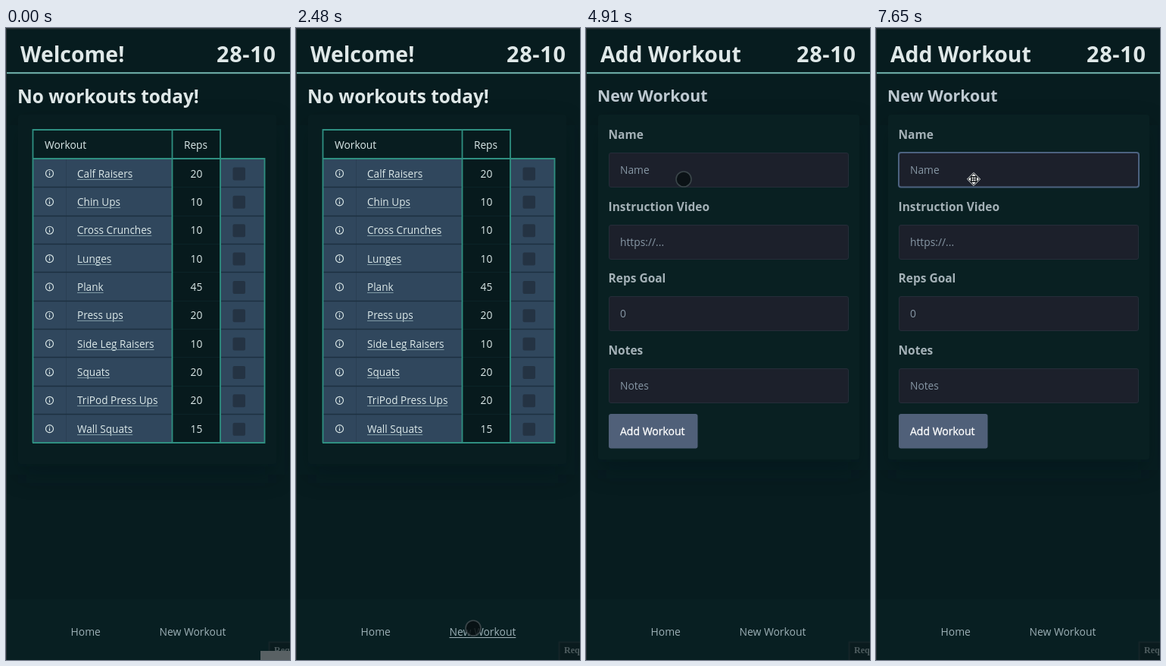
An HTML page that plays this animation: 375 by 832 pixels, repeating every 8 s.

```html
<!DOCTYPE html>
<html lang="en">
<head>
<meta charset="utf-8">
<title>Workout planner</title>
<style>
  html, body { margin: 0; width: 100%; height: 100%; overflow: hidden; background: #071c1f; }
  svg { display: block; width: 375px; height: 832px; }
  text { font-family: "Open Sans", "Noto Sans", sans-serif; white-space: pre; }
  .bold { font-weight: 700; }
  .firm { stroke: #fff; stroke-width: .3px; }
  .serif { font-family: "Liberation Serif", serif; font-weight: 700; }
</style>
</head>
<body>
<svg id="stage" viewBox="0 0 375 832" xmlns="http://www.w3.org/2000/svg">
  <defs>
    <filter id="soft" x="-20%" y="-20%" width="140%" height="140%"><feGaussianBlur stdDeviation="16"/></filter>
    <filter id="smooth" x="-20%" y="-20%" width="140%" height="140%"><feGaussianBlur stdDeviation=".7"/></filter>
    <clipPath id="listClip"><rect x="56" y="262" width="312" height="185"/></clipPath>
  </defs>
  <rect width="375" height="832" fill="#071c1f"/>
  <g id="list"></g>
  <g id="form"></g>
  <g id="frame"></g>
  <g id="popup"></g>
  <circle id="finger" r="10" fill="#081013" fill-opacity=".85" stroke="#3a4549" stroke-width="1.6"/>
  <g id="move"></g>
  <rect id="corner" x="336" y="820" width="39" height="12" fill="#596164"/>
</svg>
<script>
const $ = id => document.getElementById(id);
const LOOP = 8000;

const text = (x, y, size, fill, str, extra = "") =>
  `<text x="${x}" y="${y}" font-size="${size}" fill="${fill}" ${extra}>${str}</text>`;
const rect = (x, y, w, h, fill, extra = "") =>
  `<rect x="${x}" y="${y}" width="${w}" height="${h}" fill="${fill}" ${extra}/>`;
const path = (d, stroke, width = 1) =>
  `<path d="${d}" fill="none" stroke="${stroke}" stroke-width="${width}"/>`;
const ring = (x, y, r, stroke) =>
  `<circle cx="${x}" cy="${y}" r="${r}" fill="none" stroke="${stroke}" stroke-width="1.15"/>`;
const BOLD = 'class="bold"', FIRM = 'class="firm"', MID = 'text-anchor="middle"';
const TITLE = "#dfe8e8", CELL = "#dce9e9", NAV = "#9db0b6";

const card = (x, y, w, h, fill) =>
  rect(x, y + 14, w, h, "#05171a", 'filter="url(#soft)" opacity=".35"') + rect(x, y, w, h, fill, 'rx="4"');

function underline(el, stroke) {
  const x = el.getAttribute("x"), y = Math.round(el.getAttribute("y")) + 2.5;
  el.insertAdjacentHTML("afterend", path(`M${x} ${y}h${el.getComputedTextLength()}`, stroke));
}

function drawList() {
  const rows = ["Calf Raisers 20", "Chin Ups 10", "Cross Crunches 10", "Lunges 10", "Plank 45", "Press ups 20",
    "Side Leg Raisers 10", "Squats 20", "TriPod Press Ups 20", "Wall Squats 15"];
  const step = 37.35, top = 172, end = 546, blue = "#30475d";
  let s = text(19, 45, 28.4, TITLE, "Welcome!", BOLD)
    + text(15, 99, 24.4, TITLE, "No workouts today!", BOLD)
    + card(16, 114, 341, 460, "#081d20")
    + rect(35, top, 184, end - top, blue) + rect(283, top, 59, end - top, blue)
    + rect(219, 134, 64, end - 134, "#071a1d")
    + text(51, 159, 13.8, CELL, "Workout") + text(250.5, 159, 13.7, CELL, "Reps", MID)
    + path(`M79.5 ${top}V${end}`, "#2a4054");
  rows.forEach((row, i) => {
    const y = top + step * i, mid = y + 19.5, line = Math.round(y) + .5;
    if (i) s += path(`M36 ${line}H219M284 ${line}H341`, "#1d3040", 1.3) + path(`M220 ${line}H283`, "#0b2327");
    s += ring(57.5, mid, 5, CELL) + path(`M57.5 ${mid - .8}v3.6m0-5.8v1.2`, CELL, 1.2)
      + text(94, y + 24.5, 13.6, CELL, row.slice(0, -3), 'class="link"')
      + text(251.5, y + 24.5, 13.8, CELL, row.slice(-2), MID)
      + rect(299.5, mid - 8, 16.5, 17, "#243343", 'rx="2" filter="url(#smooth)"');
  });
  s += path(`M35.5 ${end}V134H283V${end}M219.5 134V${end}M35 ${top}H341.5V${end}H35`, "#2f8f81", 1.8);
  $("list").innerHTML = s;
  for (const el of $("list").querySelectorAll(".link")) underline(el, "#7f9aa5");
}

function drawForm() {
  const fields = [["Name", "Name"], ["Instruction Video", "https://..."], ["Reps Goal", "0"], ["Notes", "Notes"]];
  let s = text(19, 45, 28.4, TITLE, "Add Workout", BOLD)
    + text(15, 97, 21.3, "#bdc8d0", "New Workout", BOLD)
    + card(16, 114, 345, 454, "#092022");
  fields.forEach(([label, hint], i) => {
    const y = Math.round(164 + 94.7 * i);
    s += text(29.5, y - 18, 15.5, "#a4b1b7", label, BOLD)
      + rect(30.5, y + .5, 316, 45, "#1c202b", 'rx="2.5" stroke="#252d39"')
      + text(45, y + 28, 13.8, "#8797a5", hint);
  });
  $("form").innerHTML = s + rect(30, 508, 117.5, 45.5, "#506079", 'rx="3"')
    + text(45, 536, 14, "#fff", "Add Workout", FIRM)
    + rect(30, 164, 317, 45.5, "none", 'id="focus" rx="3" stroke="#4c6280" stroke-width="2"')
    + rect(45.5, 178, 1, 19, "#a9b8c2", 'id="caret"');
}

function drawFrame() {
  $("frame").innerHTML = rect(0, 752, 375, 80, "#081f22")
    + rect(0, 0, 375, 1.5, "#2a3335") + rect(0, 0, 1, 832, "#2a3335")
    + rect(1, 58.2, 374, 2, "#72b5ae")
    + text(278, 45, 28.8, TITLE, "28-10", 'class="bold" letter-spacing=".7"')
    + text(85.5, 800, 13.9, NAV, "Home")
    + text(202.5, 800, 13.9, NAV, "New Workout", 'id="navNew"')
    + rect(347.5, 808.5, 40, 30, "#0a1b1e", 'stroke="#142528" stroke-width="2"')
    + text(354, 823, 12, "#4e5c5f", "Req", 'class="serif"');
  underline($("navNew"), NAV);
}

function drawPopup() {
  const white = "#fff", dark = "#282828";
  const items = ["cactus farm?", "Big boy squats", "gay", "Gamez"];
  $("popup").innerHTML = rect(56, 232, 312, 264, dark, 'rx="7"')
    + `<path d="M68 232.5 77 224 86 232.5Z" fill="${dark}"/>`
    + text(68, 257, 11.7, white, "Saved info", FIRM)
    + path("M344 248.5l7.5 7.5m0-7.5l-7.5 7.5", white, 1.2)
    + `<g clip-path="url(#listClip)">`
    + text(69, 293, 12.7, white, "Prone Press Ups", BOLD)
    + rect(176, 275.5, 57, 21.5, "#22386a", 'rx="4"')
    + text(204.5, 290, 9.1, "#86b4f2", "Last used", MID + " " + BOLD)
    + text(69, 316, 11.6, white, "https://www.youtube.com/watch?v=Z1IM_N... · 15", FIRM)
    + items.map((str, i) => text(69, 349 + 34 * i, 13.2, white, str, FIRM)).join("")
    + `</g>`
    + rect(360, 270, 4, 118, "#747474", 'rx="2"')
    + path("M56 451.5H368", "#686868")
    + ring(78, 470, 3.8, white)
    + path("M77 477H74.5Q71.5 477 71.5 479Q72 482.5 76.5 483", white, 1.2)
    + rect(78, 475.5, 9.5, 7.5, white, 'rx="1.5"')
    + path("M80 478.2h5.5M80 480.5h3.5", dark)
    + text(94, 480, 13.3, white, "Manage personal info", FIRM);
}

function drawMove() {
  const arm = a => `<path d="M0-7 2.8-4H-2.8ZM-2.5-2.5h2v2h-2z" fill="#fff" transform="rotate(${a})"/>`;
  $("move").innerHTML = `<path d="M0-8.6 8.6 0 0 8.6-8.6 0Z" fill="#0a0f12" stroke="#e8ecec"/>`
    + [0, 90, 180, 270].map(arm).join("");
  $("move").setAttribute("transform", "translate(129 199)");
}

// Each stroke runs from where the last one ended; "bend" holds two Bezier handles.
const strokes = [
  { start: 740, end: 1210, steps: 8, to: [180, 462] },
  { start: 1400, end: 2150, steps: 12, to: [215, 761], bend: [[130, 79], [-170, 106]] },
  { start: 2220, end: 2445, steps: 4, to: [234, 790] },
  { start: 2520, end: 2820, steps: 5, to: [320, 516], bend: [[330, 720], [420, 415]] },
  { start: 3490, end: 4220, steps: 11, to: [261, 783], bend: [[322, 560], [320, 740]] },
  { start: 4300, end: 4490, steps: 4, to: [116, 255], bend: [[250, 690], [196, 457]] },
  { start: 4700, end: 4854, steps: 3, to: [129, 199] }
];

function bezier(a, b, c, d, u) {
  const v = 1 - u;
  return a.map((_, i) => v ** 3 * a[i] + 3 * v * v * u * b[i] + 3 * v * u * u * c[i] + u ** 3 * d[i]);
}

function pointer(t) {
  const i = strokes.findLastIndex(s => t >= s.start);
  if (i < 0) return null;
  const { start, end, steps, to, bend } = strokes[i];
  const from = i ? strokes[i - 1].to : [290, 842];
  const [b, c] = bend || [from, to];
  const count = 1 + Math.floor((t - start) / (end - start) * (steps - 1));
  return bezier(from, b, c, to, Math.min(1, count / steps));
}

const ramp = (t, from, to, steps) =>
  Math.min(1, Math.max(0, Math.ceil((t - from) / (to - from) * steps) / steps));
const show = (el, on) => { el.style.display = on ? "" : "none"; };

function render(t) {
  const formOpen = t >= 3090, focused = t >= 4930;
  show($("list"), !formOpen);
  show($("form"), formOpen);
  show($("navNew").nextElementSibling, t >= 2370 && !formOpen);
  show($("corner"), t < 70);
  show($("focus"), focused);
  show($("caret"), focused && Math.floor((t - 5036) / 522) % 2 === 0);

  const alpha = ramp(t, 5000, 5160, 3) * (1 - ramp(t, 7230, 7510, 4));
  $("popup").setAttribute("opacity", alpha);
  show($("popup"), alpha > 0);

  const p = pointer(t);
  show($("finger"), p && t < 6710);
  show($("move"), t >= 6710);
  if (p) $("finger").setAttribute("transform", `translate(${p})`);
}

drawList();
drawForm();
drawFrame();
drawPopup();
drawMove();

const begin = performance.now();
function tick() {
  render((performance.now() - begin) % LOOP);
  requestAnimationFrame(tick);
}
tick();
</script>
</body>
</html>
```
